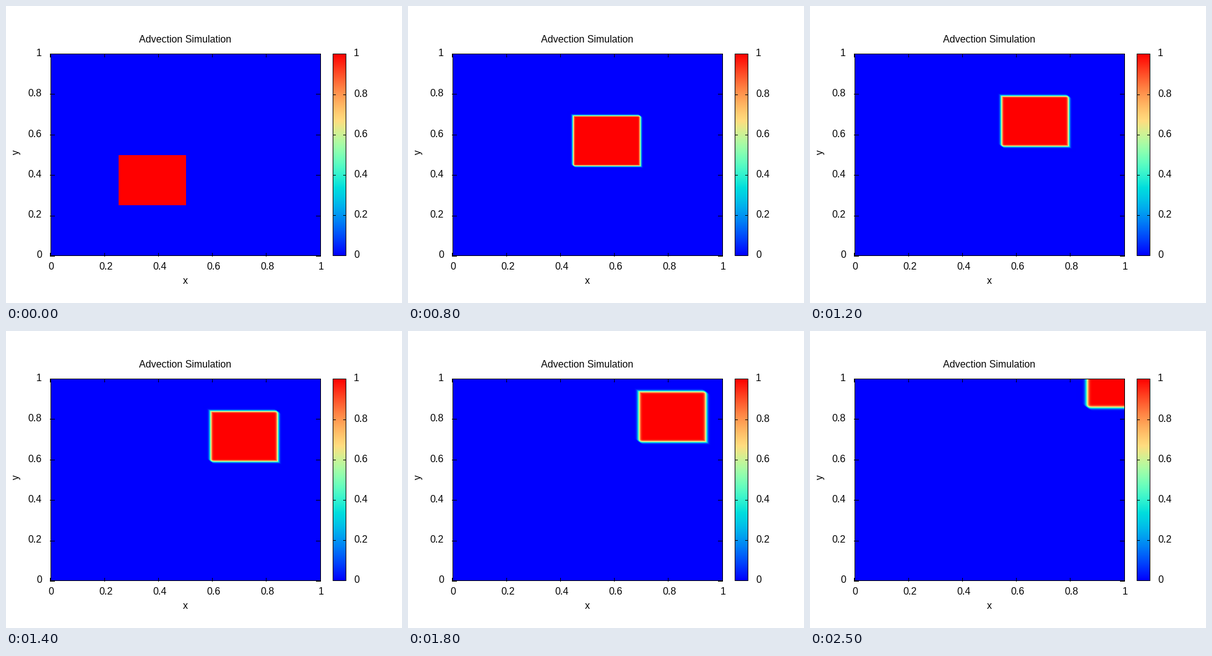
These frames come from a looping animation (640x480 px, 2600 ms). A matplotlib script:

```python
import math

import matplotlib.pyplot as plt
import numpy as np
from matplotlib.animation import FuncAnimation
from matplotlib.patches import Rectangle

W, H, DPI = 640, 480, 80
LEFT, TOP, RIGHT, BOTTOM = 72, 77, 508, 403
BAR_LEFT, BAR_RIGHT = 528, 549
FRAMES, INTERVAL = 26, 100
SPEED = 0.02436            # domain lengths per frame
SPREAD = 0.00138           # edge width grows with the square root of time
LOW, HIGH = 0.2495, 0.4995  # initial extent of the block on both axes

plt.rcParams["font.family"] = "Liberation Sans"
plt.rcParams["text.hinting"] = "native"
fig = plt.figure(figsize=(W / DPI, H / DPI), dpi=DPI, facecolor="white")
ax = fig.add_axes([0, 0, 1, 1])


def palette(v):
    """Blue - cyan - yellow - red colour ramp."""
    rgb = [3 * v - 1, np.sin(np.pi * v), np.cos(np.pi * v / 2)]
    return np.clip(np.stack(rgb, axis=-1), 0, 1)


def normal_cdf(z):
    return np.array([0.5 * (1 + math.erf(t / math.sqrt(2))) for t in z])


xs = (np.arange(LEFT + 1, RIGHT + 1) - LEFT - 0.5) / (RIGHT - LEFT)
ys = (BOTTOM - np.arange(TOP + 1, BOTTOM)) / (BOTTOM - TOP)


def density(frame):
    """Block carried along the diagonal, diffusing only across it."""
    sigma = SPREAD * math.sqrt(frame) + 1e-7
    x = xs - SPEED * frame
    y = ys - SPEED * frame
    x_lo, x_hi = (normal_cdf((edge - x) / sigma)[None, :] for edge in (LOW, HIGH))
    y_lo, y_hi = (normal_cdf((y - edge) / sigma)[:, None] for edge in (HIGH, LOW))
    return np.clip(np.minimum(x_hi, y_hi) - np.maximum(x_lo, y_lo), 0, 1)


def bar(x0, y0, x1, y1):
    """Black pixel-aligned bar, both ends included."""
    ax.add_patch(Rectangle((x0, y0), x1 - x0 + 1, y1 - y0 + 1, color="black",
                           lw=0, antialiased=False, zorder=3))


def frame_box(x0, y0, x1, y1):
    bar(x0, y0, x1, y0)
    bar(x0, y1, x1, y1)
    bar(x0, y0, x0, y1)
    bar(x1, y0, x1, y1)


def label(x, y, text, ha="center", **kw):
    ax.text(x, y, text, ha=ha, va="baseline", fontsize=16 * 72 / DPI,
            color="black", **kw)


def image(pixels, x0, y0, x1, y1):
    return ax.imshow(pixels, extent=(x0, x1, y1, y0), aspect="auto",
                     interpolation="nearest", zorder=1)


field = image(palette(density(0)), LEFT + 1, TOP + 1, RIGHT + 1, BOTTOM)
ramp = np.linspace(1, 0, BOTTOM - TOP)
image(palette(ramp[:, None]), BAR_LEFT, TOP, BAR_RIGHT + 1, BOTTOM)

frame_box(LEFT, TOP, RIGHT, BOTTOM)
frame_box(BAR_LEFT, TOP, BAR_RIGHT, BOTTOM)

for i in range(6):
    text = f"{i / 5:g}"
    tx = round(71.4 + 87.25 * i)
    ty = round(404 - 65.4 * i)
    bar_y = round(403.4 - 65.2 * i)
    bar(tx, TOP, tx, TOP + 5)
    bar(tx, BOTTOM - 4, tx, BOTTOM + 1)
    bar(LEFT - 1, ty, LEFT + 6, ty)
    bar(RIGHT - 7, ty, RIGHT, ty)
    bar(BAR_LEFT, bar_y, BAR_LEFT + 4, bar_y)
    bar(BAR_RIGHT - 4, bar_y, BAR_RIGHT, bar_y)
    label(tx + (1.5 if len(text) == 1 else 2.5), 426, text)
    label(58, round(407.2 - 65.2 * i), text, ha="right")
    label(562, bar_y + 4, text, ha="left")

label(289.5, 59, "Advection Simulation")
label(290, 449, "x")
label(20.5, 236, "y", rotation=90, rotation_mode="anchor")

ax.set_xlim(0, W)
ax.set_ylim(H, 0)
ax.axis("off")


def update(frame):
    field.set_data(palette(density(frame)))
    return (field,)


anim = FuncAnimation(fig, update, frames=FRAMES, interval=INTERVAL,
                     repeat=True, repeat_delay=0, blit=False)
plt.show()
```
